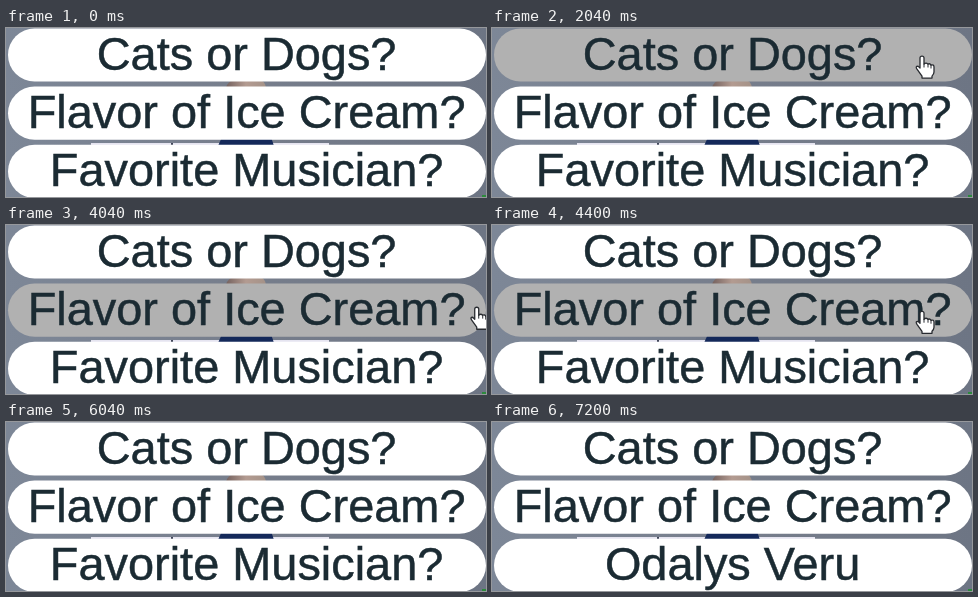
Write an HTML page that moves like this. It is 480 by 169 pixels and loops after 7680 ms.

```html
<!DOCTYPE html>
<html lang="en">
<head>
<meta charset="utf-8">
<title>Questions</title>
<style>
  html, body { margin: 0; width: 100%; height: 100%; overflow: hidden; background: #747c8b; }
  svg { display: block; width: 480px; height: 169px; }
  text {
    font: 46.9px "Liberation Sans", Arial, sans-serif; text-anchor: middle;
    fill: #1b2b33; stroke: #1b2b33; stroke-width: .5px;
  }
</style>
</head>
<body>
<svg viewBox="0 0 480 169">
  <defs>
    <linearGradient id="wall">
      <stop offset="0" stop-color="#7d8797"/>
      <stop offset=".5" stop-color="#777e8c"/>
      <stop offset="1" stop-color="#6d7584"/>
    </linearGradient>
    <linearGradient id="skin">
      <stop offset="0" stop-color="#75625f"/>
      <stop offset=".5" stop-color="#b39b91"/>
      <stop offset="1" stop-color="#a49288"/>
    </linearGradient>
  </defs>
  <rect width="480" height="169" fill="url(#wall)"/>
  <path d="M220 60Q222 52 230 52H254Q259 53 260 60Z" fill="url(#skin)"/>
  <rect x="85" y="115" width="238" height="4" fill="#e5e4f0"/>
  <path d="M216 109H265L268 118H212Z" fill="#14295a"/>
  <rect x="165" y="115" width="2" height="2" fill="#404659"/>
  <rect x="476" y="167" width="4" height="2" fill="#2c8a3c"/>
  <g id="rows"></g>
  <g id="hand" stroke-linejoin="round" stroke-linecap="round">
    <path d="M-2 2Q-2 0 0 0T2 2V8Q4 6 6 8Q8 7 9 9Q12 8 12 11V16Q12 18 10 20V22H0V20L-5 13Q-7 10-4 10L-2 12Z"
      fill="#fff" stroke="#282b30" stroke-width="1.3"/>
    <path d="M2 8V11M6 8V11M9 9V12" fill="none" stroke="#282b30"/>
  </g>
</svg>
<script>
const LOOP = 7680, CLICK = 480, LEAVE = 840, SPEED = 0.275, REACH = 52;
const TOP = 0.4, PITCH = 58.2, HEIGHT = 53.2;
const rows = [
  { ask: "Cats or Dogs?", answer: "Dogs", enter: 1840, reset: 3240 },
  { ask: "Flavor of Ice Cream?", answer: "Strawberry", enter: 4000, reset: 5640 },
  { ask: "Favorite Musician?", answer: "Odalys Veru", enter: 6360, reset: LOOP }
];
const hand = document.getElementById("hand");
const group = document.getElementById("rows");

function add(tag, attrs) {
  const el = document.createElementNS("http://www.w3.org/2000/svg", tag);
  for (const key in attrs) el.setAttribute(key, attrs[key]);
  return group.appendChild(el);
}

rows.forEach((row, i) => {
  row.top = TOP + i * PITCH;
  row.pill = add("rect", { x: 2, y: row.top, width: 478, height: HEIGHT, rx: HEIGHT / 2 });
  row.label = add("text", { x: 240.6, y: row.top + 41.5 });
});

function draw(now) {
  const time = now % LOOP;
  let active = null;
  for (const row of rows) {
    const since = time - row.enter;
    const hover = since >= 0 && since < LEAVE;
    const answered = since >= CLICK && time < row.reset;
    row.pill.setAttribute("fill", hover ? "#b1b1b1" : "#fff");
    row.label.textContent = answered ? row.answer : row.ask;
    if (hover) active = row;
  }
  hand.style.display = active ? "" : "none";
  if (active) {
    // The pointer slides in from the right, rests, then slides back out.
    const since = time - active.enter;
    const slide = Math.min(REACH, SPEED * Math.min(since, LEAVE - since));
    hand.setAttribute("transform", `translate(${482 - slide} ${active.top + 22.5 + slide * 0.1})`);
  }
  requestAnimationFrame(draw);
}
draw(performance.now());
</script>
</body>
</html>
```
